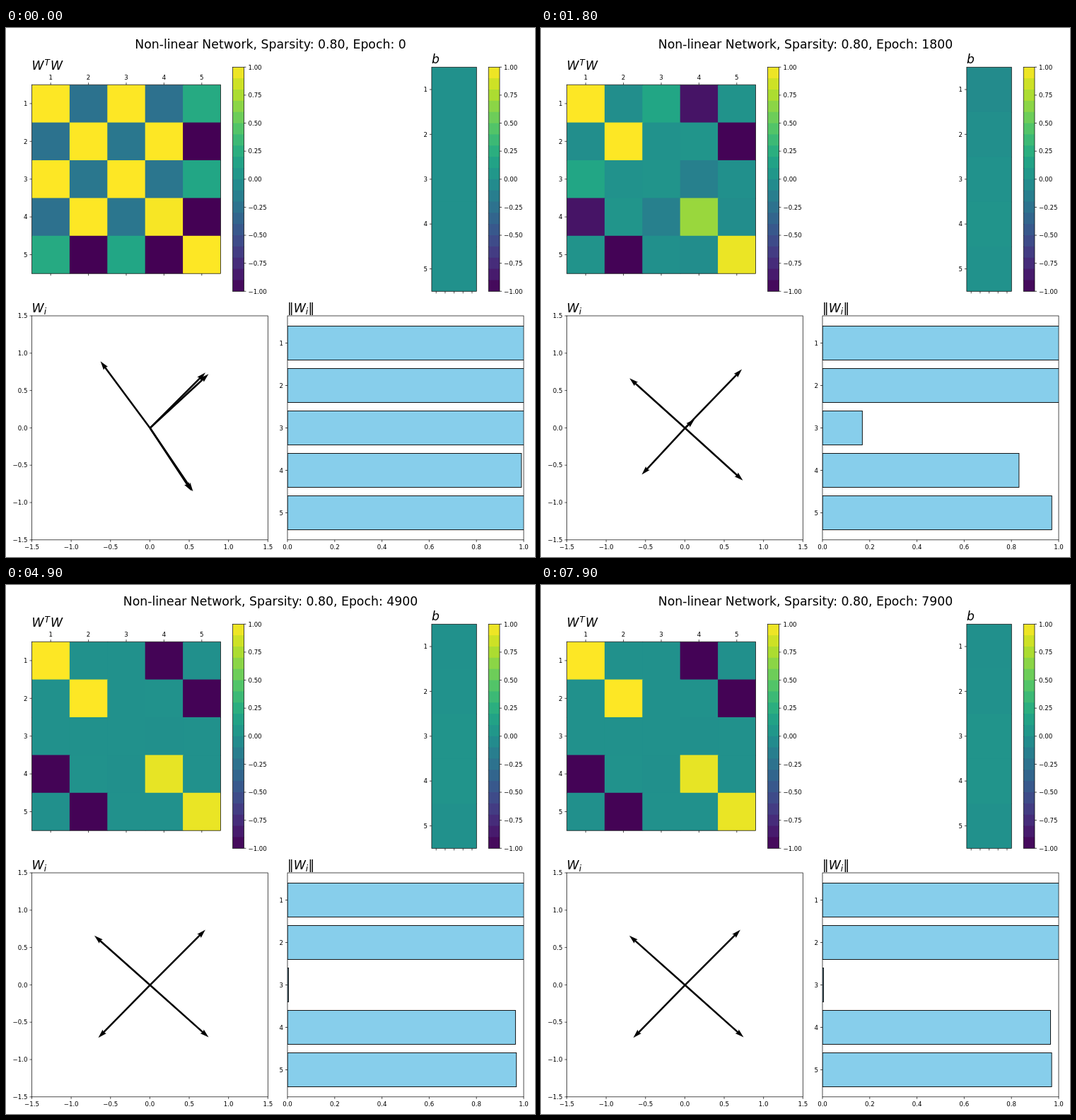
Animation, 748 px wide and 748 px high, one loop 8 s. Source, as an HTML page with a canvas:

```html
<!DOCTYPE html>
<html lang="en">
<head>
<meta charset="utf-8">
<title>Sparse network training</title>
<style>
html, body { margin: 0; width: 100%; height: 100%; overflow: hidden; background: #fff; }
canvas { display: block; width: 748px; height: 748px; }
</style>
</head>
<body>
<canvas id="stage" width="748" height="748"></canvas>
<script>
const ctx = document.getElementById('stage').getContext('2d');
const FONT = '"DejaVu Sans", sans-serif';
const SMALL = 8.65, LARGE = 17.3, SCRIPT = LARGE * 0.7, THIN = 0.7, TICK = 3;
const STEP = 100, STEPS = 80;
const ONE_TO_FIVE = [1, 2, 3, 4, 5];
const VIRIDIS = ['440154', '482475', '414487', '355f8d', '2a788e', '21918c',
  '22a884', '44bf70', '7ad151', 'bddf26', 'fde725']
  .map(h => [0, 2, 4].map(i => parseInt(h.slice(i, i + 2), 16)));

// Damped approach from a to b; push is an extra initial speed.
const settle = (k, a, b, tau, push = 0) => b + (a - b + push * k) * Math.exp(-k / tau);

// Repeatable training noise in [-1, 1], once the weights have settled.
function noise(k, seed) {
  if (k < 24) return 0;
  const s = Math.sin(k * 12.9898 + seed * 78.233) * 43758.5453;
  return 2 * (s - Math.floor(s)) - 1;
}

// The five columns of W: two opposite pairs form, the third column dies out.
function weights(k) {
  const wobble = Math.sin(Math.PI * k / 12) * Math.exp(-k / 16);
  const fade = Math.max(0, 1 - k / 33) ** 2.33;
  const n4 = 1 + 0.005 * noise(k, 4), n5 = 1 + 0.005 * noise(k, 5);
  return [
    [0.703 - 0.06 * wobble, 0.742 - 0.14 * wobble],
    [settle(k, 0.546, 0.744, 4, -0.037), settle(k, -0.848, -0.7, 4)],
    [0.003 + 0.74 * fade, 0.003 + 0.72 * fade],
    [settle(k, 0.525, -0.66, 4, 0.482) * n4, settle(k, -0.84, -0.709, 5.5, 0.132) * n4],
    [settle(k, -0.63, -0.705, 1.5) * n5, settle(k, 0.895, 0.66, 5.2) * n5]
  ];
}

function biases(k) {
  const rest = [0, 0, 0.03, 0.02, 0.01], push = [-0.09, -0.03, -0.035, 0.015, 0.005];
  return rest.map((r, i) => settle(k, 0, r, 5, push[i]) + 0.01 * noise(k, i + 9));
}

function color(v) {
  const p = Math.max(0, Math.min(1, (v + 1) / 2)) * 10;
  const i = Math.min(9, Math.floor(p)), a = VIRIDIS[i], b = VIRIDIS[i + 1];
  return `rgb(${a.map((n, j) => Math.round(n + (b[j] - n) * (p - i))).join()})`;
}

function text(str, x, y, align = 'left', size = SMALL, style = '') {
  ctx.font = `${style} ${size}px ${FONT}`;
  ctx.textAlign = align;
  ctx.fillStyle = '#000';
  ctx.fillText(str, x, y);
}
const math = (str, x, y, size = LARGE) => text(str, x, y, 'left', size, 'italic');
const num = (v, digits) => v.toFixed(digits).replace('-', '\u2212');

function line(x1, y1, x2, y2) {
  ctx.lineWidth = THIN;
  ctx.beginPath();
  ctx.moveTo(x1, y1);
  ctx.lineTo(x2, y2);
  ctx.stroke();
}

function frame(x, y, w, h) {
  ctx.lineWidth = THIN;
  ctx.strokeRect(x, y, w, h);
}

function clipped(x, y, w, h, paint) {
  ctx.save();
  ctx.beginPath();
  ctx.rect(x, y, w, h);
  ctx.clip();
  paint();
  ctx.restore();
}

// Cells overlap the next one by a pixel so that no seam shows.
function grid(rows, x, y, w, h) {
  const ch = h / rows.length, cw = w / rows[0].length;
  clipped(x, y, w, h, () => rows.forEach((row, r) => row.forEach((v, c) => {
    ctx.fillStyle = color(v);
    ctx.fillRect(x + c * cw, y + r * ch, cw + 1, ch + 1);
  })));
  frame(x, y, w, h);
}

function leftTick(x, y, label) {
  line(x, y, x - TICK, y);
  text(label, x - 6, y + 3.2, 'right');
}

function bottomTick(x, y, label) {
  line(x, y, x, y + TICK);
  if (label) text(label, x, y + 13, 'center');
}

function colorbar(x) {
  const y = 55.3, w = 15.8, h = 317, bands = 20;
  grid(Array.from({ length: bands }, (_, i) => [1 - (2 * i + 1) / bands]), x, y, w, h);
  for (let i = 0; i <= 8; i++) {
    const ty = y + h * i / 8;
    line(x + w, ty, x + w + TICK, ty);
    text(num(1 - i / 4, 2), x + w + 6, ty + 3.2);
  }
}

function heatmap(w) {
  const x = 36.5, y = 80.2, s = 53.4, side = s * 5;
  grid(w.map(a => w.map(b => a[0] * b[0] + a[1] * b[1])), x, y, side, side);
  ONE_TO_FIVE.forEach((n, i) => {
    const m = (i + 0.5) * s;
    leftTick(x, y + m, n);
    bottomTick(x + m, y + side);
    line(x + m, y, x + m, y - TICK);
    text(n, x + m, y - 7.7, 'center');
  });
  math('W', 36.5, 59.3);
  math('T', 54.4, 53, SCRIPT);
  math('W', 63, 59.3);
  colorbar(320.6);
}

function biasColumn(b) {
  const x = 601.9, y = 55.3, s = 63.4;
  grid(b.map(v => [v]), x, y, s, s * 5);
  ONE_TO_FIVE.forEach((n, i) => {
    leftTick(x, y + (i + 0.5) * s, n);
    bottomTick(x + (i + 0.5) * s / 5, y + s * 5);
  });
  math('b', 602, 49.8);
  colorbar(682.2);
}

function arrow(x, y, dx, dy) {
  const len = Math.hypot(dx, dy), t = Math.min(2.5, len / 5);
  const half = [[0, 0.5 * t], [len - 4.5 * t, 0.5 * t], [len - 5 * t, 1.5 * t]];
  ctx.save();
  ctx.translate(x, y);
  ctx.rotate(Math.atan2(dy, dx));
  ctx.beginPath();
  half.forEach(p => ctx.lineTo(p[0], p[1]));
  ctx.lineTo(len, 0);
  half.reverse().forEach(p => ctx.lineTo(p[0], -p[1]));
  ctx.fill();
  ctx.restore();
}

function vectorPlot(w) {
  const x = 36.5, y = 407, width = 333.8, height = 316.8;
  const cx = x + width / 2, cy = y + height / 2, ux = width / 3, uy = height / 3;
  ctx.fillStyle = '#000';
  w.forEach(v => arrow(cx + 0.3, cy + 0.3, v[0] * ux, -v[1] * uy));
  frame(x, y, width, height);
  for (let i = -3; i <= 3; i++) {
    const label = num(i / 2, 1);
    leftTick(x, cy - i * uy / 2, label);
    bottomTick(cx + i * ux / 2, y + height, label);
  }
  math('W', 36.5, 401.8);
  math('i', 53.7, 404.6, SCRIPT);
}

function normBars(w) {
  const x = 398, y = 407, width = 334, height = 316.8, pitch = 60, thick = 48;
  clipped(x, y, width, height, () => w.forEach((v, i) => {
    const len = Math.hypot(v[0], v[1]) * width, top = 421.5 + i * pitch;
    ctx.fillStyle = '#87ceeb';
    ctx.fillRect(x, top, len, thick);
    ctx.lineWidth = 0.9;
    ctx.strokeRect(x, top, len, thick);
  }));
  frame(x, y, width, height);
  ONE_TO_FIVE.forEach((n, i) => leftTick(x, 445.5 + i * pitch, n));
  for (let i = 0; i <= 5; i++) bottomTick(x + width * i / 5, y + height, num(i / 5, 1));
  text('\u2016', 398, 401.8, 'left', LARGE);
  math('W', 406.7, 401.8);
  math('i', 423.8, 404.6, SCRIPT);
  text('\u2016', 427.6, 401.8, 'left', LARGE);
}

function draw(k) {
  const w = weights(k);
  ctx.fillStyle = '#fff';
  ctx.fillRect(0, 0, 748, 748);
  ctx.strokeStyle = '#000';
  text(`Non-linear Network, Sparsity: 0.80, Epoch: ${k * 100}`, 374, 28.7, 'center', LARGE);
  heatmap(w);
  biasColumn(biases(k));
  vectorPlot(w);
  normBars(w);
}

const start = performance.now();
let shown = -1;
function tick() {
  const k = Math.floor(Math.max(0, performance.now() - start) / STEP) % STEPS;
  if (k !== shown) draw(shown = k);
  requestAnimationFrame(tick);
}
tick();
</script>
</body>
</html>
```
